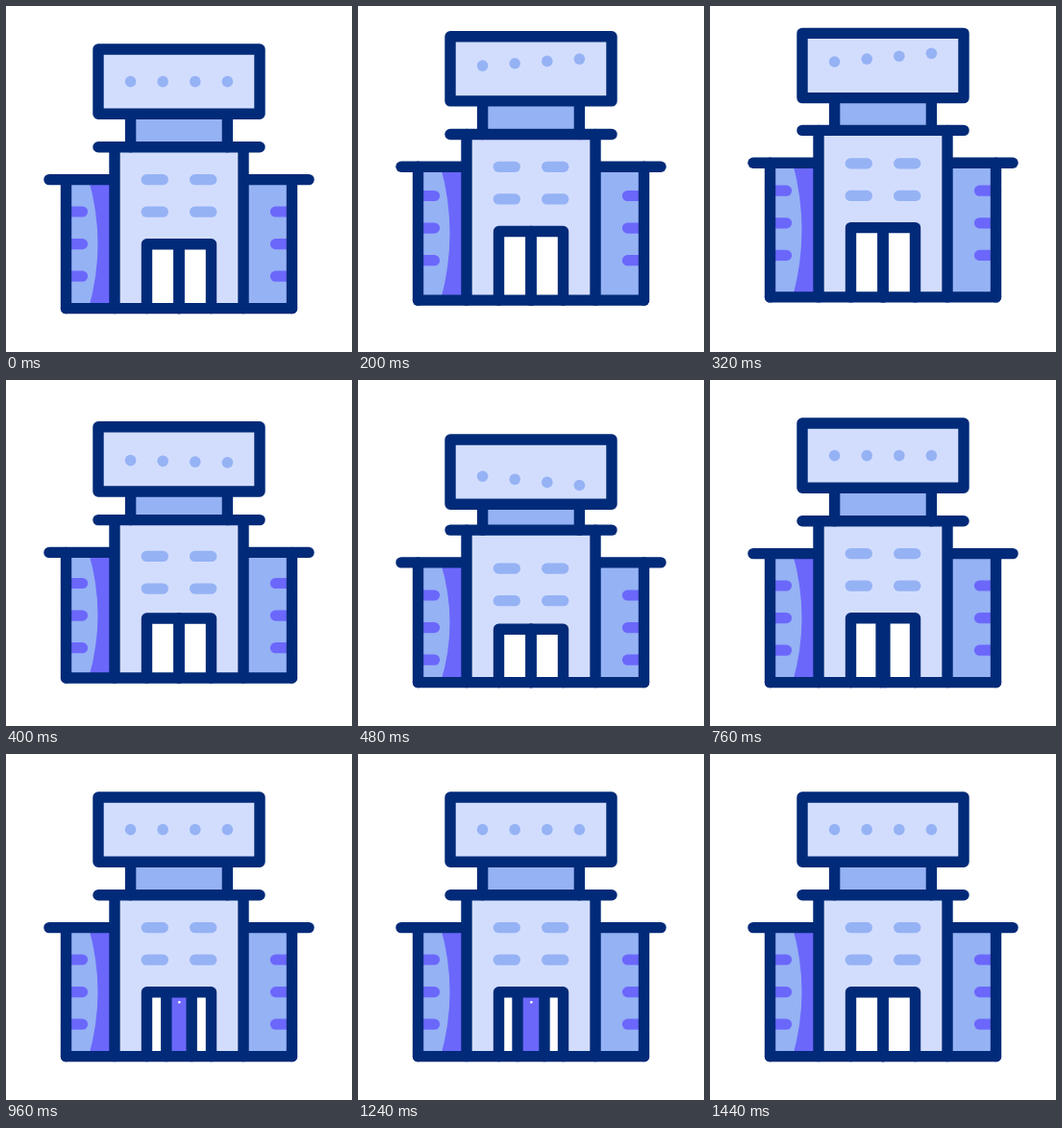
An HTML page with a canvas for the animation above (1.48 s loop, 360x360 px).

```html
<!DOCTYPE html>
<html lang="en">
<head>
<meta charset="utf-8">
<title>Building</title>
<style>
  html, body { margin: 0; width: 100%; height: 100%; overflow: hidden; background: #fff; }
  canvas { display: block; width: 360px; height: 360px; }
</style>
</head>
<body>
<canvas id="stage"></canvas>
<script>
const LOOP = 1480, STEP = 40, SIZE = 360;
const NAVY = '#012a78', LIGHT = '#d2ddfe', MID = '#95b2f4', PURPLE = '#6b67fb', WHITE = '#fff';

const canvas = document.getElementById('stage');
const ctx = canvas.getContext('2d');
const ratio = window.devicePixelRatio || 1;
canvas.width = canvas.height = SIZE * ratio;
ctx.scale(ratio, ratio);
ctx.lineCap = ctx.lineJoin = 'round';

// Eased progress from time a to time b.
function ease(t, a, b) {
  const p = Math.min(1, Math.max(0, (t - a) / (b - a)));
  return p * p * (3 - 2 * p);
}

// Jump to `up`, squash to `down`, settle at zero.
function hop(t, up, down) {
  if (t < 280) return up * ease(t, 80, 280);
  if (t < 480) return up + (down - up) * ease(t, 280, 480);
  return down * (1 - ease(t, 480, 680));
}

function box(x1, y1, x2, y2, fill) {
  ctx.fillStyle = fill;
  ctx.fillRect(x1, y1, x2 - x1, y2 - y1);
}

function line(color, width, ...points) {
  ctx.strokeStyle = color;
  ctx.lineWidth = width;
  ctx.beginPath();
  for (let i = 0; i < points.length; i += 2) ctx.lineTo(points[i], points[i + 1]);
  ctx.stroke();
}

const outline = (...points) => line(NAVY, 11.4, ...points);

function dot(x, y, r, fill) {
  ctx.fillStyle = fill;
  ctx.beginPath();
  ctx.arc(x, y, r, 0, 2 * Math.PI);
  ctx.fill();
}

function drawWings(t, top, base) {
  box(62.5, top, 113, base, MID);
  box(247, top, 297.5, base, MID);

  ctx.fillStyle = PURPLE;
  ctx.beginPath();
  ctx.moveTo(86, top);
  ctx.quadraticCurveTo(105, (top + base) / 2, 86, base);
  ctx.lineTo(113, base);
  ctx.lineTo(113, top);
  ctx.fill();

  const shift = hop(t, -25.5, 10);
  for (const y of [214, 247.6, 281.2]) {
    line(PURPLE, 11.2, 62.5, y + shift, 79.5, y + shift);
    line(PURPLE, 11.2, 280.5, y + shift, 297.5, y + shift);
  }
  outline(45, top, 113, top);
  outline(247, top, 315, top);
  outline(62.5, top, 62.5, base);
  outline(297.5, top, 297.5, base);
}

function drawDoor(t, base) {
  const top = 247.8 + hop(t, -20.5, 11.5);
  const gap = 15.1 * (ease(t, 680, 1040) - ease(t, 1200, 1440));
  box(146.5, top, 213.5, base, WHITE);
  box(180 - gap, top, 180 + gap, base, PURPLE);
  dot(180.3, top + 10.4, 1.3, WHITE);
  outline(180 - gap, top, 180 - gap, base);
  outline(180 + gap, top, 180 + gap, base);
  outline(146.5, base, 146.5, top, 213.5, top, 213.5, base);
}

function drawSign(t, ledge) {
  const shift = hop(t, -20.5, 17);
  const top = 45 + shift, bottom = 112.2 + shift;
  box(129.6, bottom, 230.4, ledge, MID);
  outline(129.6, bottom, 129.6, ledge);
  outline(230.4, bottom, 230.4, ledge);
  outline(96, ledge, 264, ledge);
  box(96, top, 264, bottom, LIGHT);
  outline(96, top, 264, top, 264, bottom, 96, bottom, 96, top, 264, top);
  for (let i = 0; i < 4; i++) {
    dot(129.6 + 33.6 * i, 78.6 + hop(t, -25.5 - 3.6 * i, 21.6 + 3.1 * i), 5.8, MID);
  }
}

function draw(t) {
  box(0, 0, SIZE, SIZE, WHITE);
  const base = 314.6 + hop(t, -13.1, 0);
  const roof = hop(t, -20.5, 9.3);
  const ledge = 146.8 + roof;

  drawWings(t, 180.6 + roof, base);
  box(113, ledge, 247, base, LIGHT);

  const shift = hop(t, -20.5, 15.5);
  for (const y of [180.6, 214.2]) {
    line(MID, 11.2, 146.2, y + shift, 163.4, y + shift);
    line(MID, 11.2, 196.6, y + shift, 213.8, y + shift);
  }
  drawDoor(t, base);
  outline(113, ledge, 113, base);
  outline(247, ledge, 247, base);
  outline(62.5, base, 297.5, base);
  drawSign(t, ledge);
}

const start = performance.now();
function tick() {
  const t = (performance.now() - start) % LOOP;
  draw(Math.floor(t / STEP) * STEP);
  requestAnimationFrame(tick);
}
tick();
</script>
</body>
</html>
```
